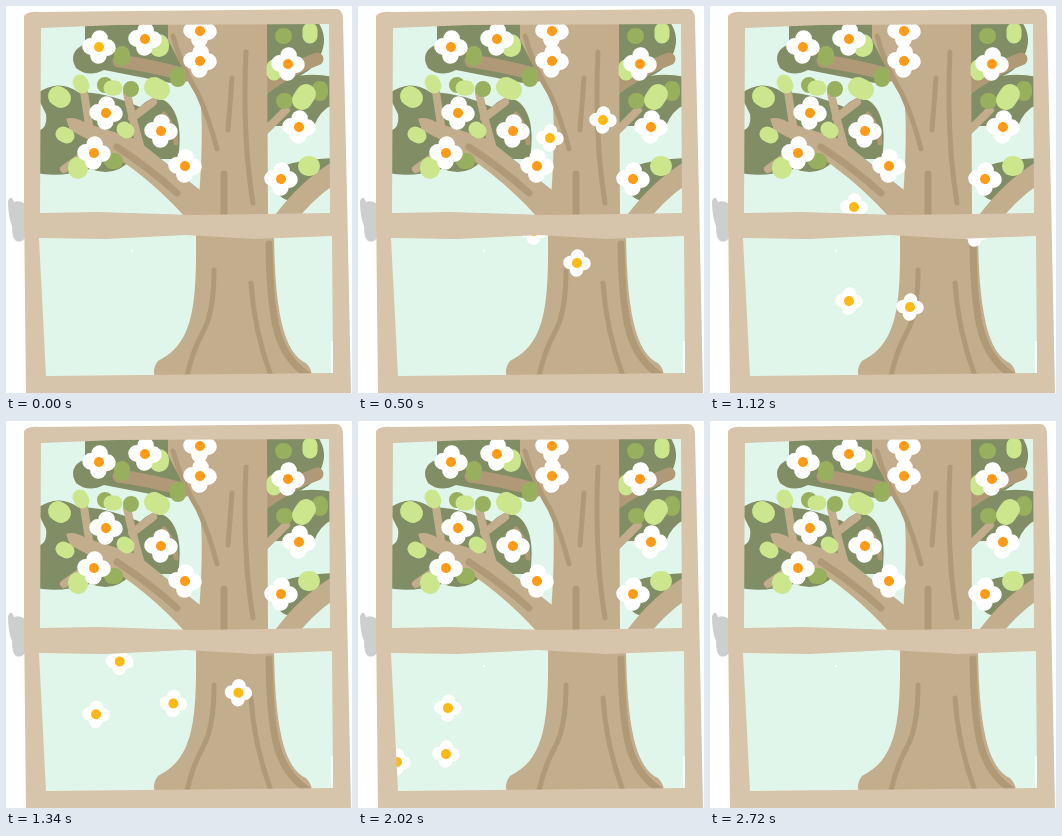
An HTML page for the animation above (3680 ms loop, 346 px wide and 387 px high).

```html
<!DOCTYPE html>
<html lang="en">
<head>
<meta charset="utf-8">
<title>Blossom window</title>
<style>
  html, body { margin: 0; width: 100%; height: 100%; overflow: hidden; background: #fff; }
  svg { display: block; width: 100vw; height: 100vh; }
  .stroke { fill: none; stroke-linecap: round; stroke-linejoin: round; }
  .bark { fill: #c2ad8d; }
  .limb { stroke: #c2ad8d; }
  .grain { stroke: #af9977; }
  .dark { fill: #808d65; }
  .mid { stroke: #98b05d; }
  .light { stroke: #cbe68c; }
  .wood { fill: #d6c5aa; }
</style>
</head>
<body>
<svg viewBox="0 0 346 387">
  <defs>
    <clipPath id="pane"><path d="M30 15H330V374H30Z"/></clipPath>
    <g id="petals" fill="#fff">
      <circle cy="-8.5" r="8.3"/><circle cx="8.5" r="8.3"/>
      <circle cy="8.5" r="8.3"/><circle cx="-8.5" r="8.3"/>
    </g>
  </defs>
  <path fill="#cecece" d="M2 195Q5 188 8 196Q14 194 19 198V231Q17 237 10 235Q6 232 6 220Q2 210 2 195Z"/>
  <path fill="#e1f6ea" d="M28 14H331V377H28Z"/>

  <g clip-path="url(#pane)">
    <g class="dark">
      <path d="M79 16H166Q160 36 176 52Q180 70 170 78L98 64Q82 72 70 62Q61 46 79 38Z"/>
      <path d="M30 88Q52 72 72 86Q100 86 134 101Q148 86 162 97Q178 112 172 153H125Q110 172 84 163Q54 172 30 167V125Q42 124 40 108Z"/>
      <path d="M259 16H312Q323 32 314 50Q304 74 259 78Z"/>
      <path d="M259 80Q290 64 328 71V98Q314 104 308 120H259Z"/>
      <path d="M263 168Q278 154 328 152V168Q304 178 292 194Q272 200 263 168Z"/>
    </g>

    <!-- Branches -->
    <path class="stroke grain" stroke-width="13" d="M113 55Q142 59 180 69M258 82Q286 62 311 53"/>
    <path class="stroke grain" stroke-width="5" d="M158 108Q170 123 170 137"/>
    <path class="stroke limb" stroke-width="8"
      d="M78 86L83 119M121 87Q126 112 136 146M147 96L126 112M258 126L280 104M58 163L82 146"/>
    <path class="stroke limb" stroke-width="20" d="M278 214Q300 184 332 164"/>
    <path class="bark" d="M60 113Q68 110 80 117L130 133L194 184V212H180Q132 158 64 124Z"/>

    <!-- Trunk -->
    <path class="bark" d="M162 16H261L262 212L268 230C269 290 274 345 300 357Q307 364 306 374H150Q145 363 152 355C186 338 191 304 190 228Q199 130 194 92Q176 62 162 34Z"/>
    <path class="stroke grain" stroke-width="5"
      d="M167 30Q176 62 192 88Q203 112 211 143M240 46Q236 130 247 197M226 72L222 124
         M208 264Q208 306 197 326Q186 346 181 370M245 277Q248 324 265 370"/>
    <path class="stroke grain" stroke-width="7"
      d="M218 168V212M111 141Q142 161 171 187M263 238Q264 310 274 334Q282 356 303 370"/>

    <!-- Leaves: short, thick, round strokes -->
    <path class="stroke mid" stroke-width="16"
      d="M116 48v4M99 79h0M125 83h0M172 69v4M277 30h1M278 95h1M314 83v4M106 155h3"/>
    <path class="stroke light" stroke-width="15"
      d="M74 76l2 4M118 123l3 2M57 128l4 2M304 24v6M268 61v6M105 82h4"/>
    <path class="stroke light" stroke-width="20"
      d="M52 90l3 2M72 161v2M148 81l6 3M153 38v3M300 88l-4 6M302 160h2"/>

    <g id="under"></g>
    <g id="blossoms"></g>
    <g id="over"></g>
  </g>

  <path class="wood" fill-rule="evenodd" d="M18 10Q22 5 34 6L331 3Q337 4 337 14L341 190L345 387H20L18 200Z
    M35 22L34 207L92 206L188 209L324 207L323 18L110 19Z
    M33 232L40 370L327 367L326 230L248 233L180 229L100 233Z"/>
  <path d="M326 335V367" stroke="#fff" stroke-width="1.5"/>
  <circle cx="126" cy="245" r="1" fill="#fff"/>
</svg>
<script>
const LOOP = 3680, STEP = 20;
const TILT = 4;
const BEATS = [0, 500, 820, 1120, 1540, 2020, 2720];
const EXIT = [-58, 92];

const blossoms = [[93, 41], [139, 33], [194, 25], [194, 55], [282, 58], [100, 107],
  [155, 125], [293, 121], [88, 147], [179, 160], [275, 173]];

// A falling flower leaves its blossom, passes one point per beat, then drifts out.
const falling = [
  fall('over', blossoms[0], [176, 225], [174, 271], [139, 295], [41, 289], [-70, 290]),
  fall('under', blossoms[3], [192, 132], [158, 155], [144, 201], [85, 275], [39, 341]),
  fall('under', blossoms[4], [245, 114], [228, 188], [265, 227], [189, 307], [88, 333]),
  fall('under', blossoms[10], [219, 257], [217, 283], [200, 301], [137, 267], [90, 287])
];

function fall(layer, ...points) {
  const [x, y] = points[points.length - 1];
  points.push([x + EXIT[0], y + EXIT[1]]);
  return { points, node: addFlower(layer, 0.82, '#ffb913') };
}

function addFlower(layer, scale, color) {
  const flower = document.createElementNS('http://www.w3.org/2000/svg', 'g');
  flower.innerHTML = `<use href="#petals" transform="scale(${scale})"/><circle r="5" fill="${color}"/>`;
  document.getElementById(layer).append(flower);
  return flower;
}

function place(node, [x, y]) {
  node.setAttribute('transform', `translate(${x} ${y}) rotate(${TILT})`);
}

// Smooth curve through the points, with slopes taken from the neighbours.
function positionAt(points, time) {
  const i = BEATS.findIndex(beat => beat > time) - 1;
  const last = BEATS.length - 1;
  const span = BEATS[i + 1] - BEATS[i];
  const u = (time - BEATS[i]) / span;
  return [0, 1].map(axis => {
    const slope = k => {
      const from = Math.max(0, k - 1), to = Math.min(last, k + 1);
      return (points[to][axis] - points[from][axis]) / (BEATS[to] - BEATS[from]) * span;
    };
    const a = points[i][axis], change = points[i + 1][axis] - a;
    const s0 = slope(i), s1 = slope(i + 1);
    return a + u * (s0 + u * (3 * change - 2 * s0 - s1 + u * (s0 + s1 - 2 * change)));
  });
}

for (const point of blossoms) place(addFlower('blossoms', 1, '#ff9b16'), point);

const start = performance.now();
function draw() {
  const elapsed = (performance.now() - start) % LOOP;
  const time = Math.floor(elapsed / STEP) * STEP;
  const visible = time < BEATS[BEATS.length - 1];
  for (const { node, points } of falling) {
    node.style.display = visible ? '' : 'none';
    if (visible) place(node, positionAt(points, time));
  }
  requestAnimationFrame(draw);
}
draw();
</script>
</body>
</html>
```
